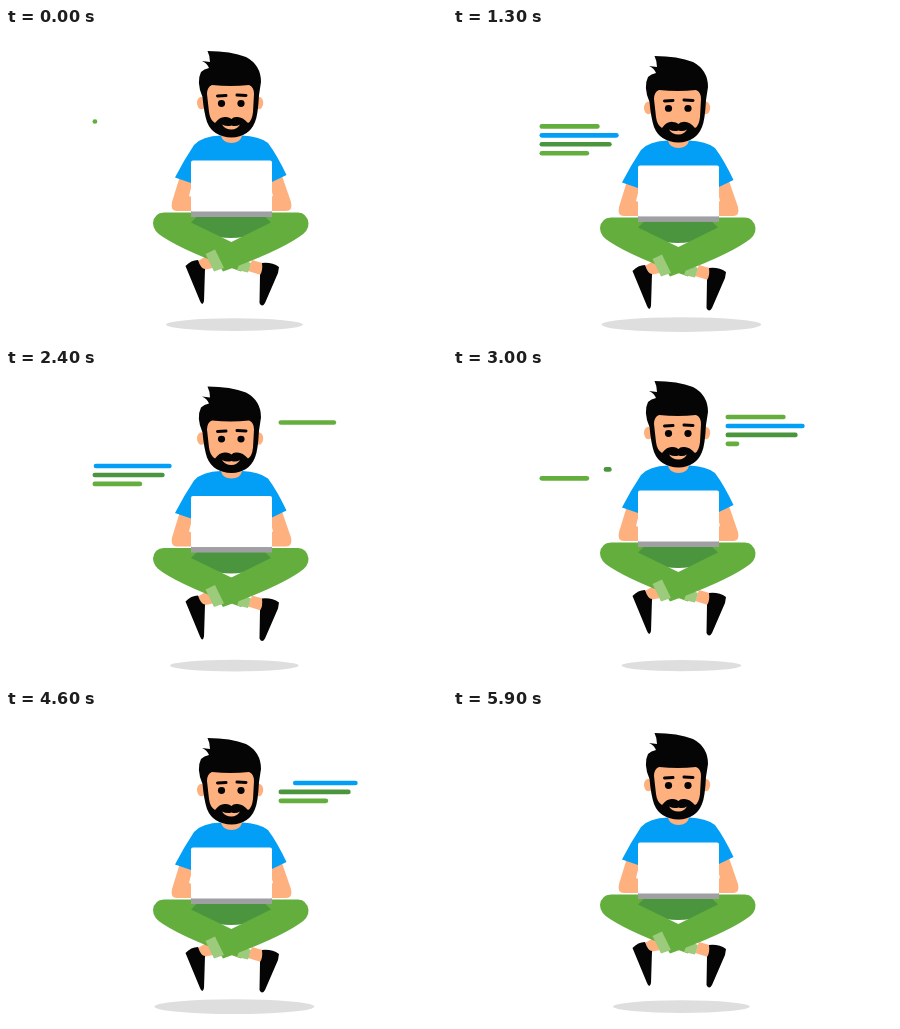
An HTML page with a canvas that plays this animation: 441 by 313 pixels, repeating every 6 s.

```html
<!DOCTYPE html>
<html lang="en">
<head>
<meta charset="utf-8">
<title>Floating coder</title>
<style>
html, body { margin: 0; width: 100%; height: 100%; overflow: hidden; background: #fff; }
canvas { display: block; width: 441px; height: 313px; }
</style>
</head>
<body>
<canvas id="stage" width="441" height="313"></canvas>
<script>
const ctx = document.getElementById('stage').getContext('2d');
const LOOP = 6000, STEP = 100;
const SKIN = '#ffb07f', BLUE = '#039ff6', GREEN = '#64ae3e', DARK = '#4b953f',
      CUFF = '#9bcb7b', BLACK = '#050505';

// Vertical drift of the figure: [time, offset]
const DRIFT = [[0, 0], [800, 5.9], [950, 6.4], [1400, 4.3], [1700, 2], [2100, -2],
  [2800, -10], [2980, -11], [3500, -6], [3800, -2], [4200, 2], [4600, 5],
  [5030, 7], [5600, 2.3], [5900, 0], [6000, -0.4]];

// Code lines: [length, colour]
const LINES = [[60, GREEN], [79, BLUE], [72, DARK], [49.5, GREEN]];
const LINE_GAP = 8.95, LINE_WIDTH = 4.6;
const TYPE_TIME = 267, ERASE_START = 2085, ERASE_TIME = 310;

const clamp = v => Math.max(0, Math.min(1, v));

function drift(t) {
  const slope = i => {
    const a = DRIFT[i - 1], b = DRIFT[i], c = DRIFT[i + 1];
    if (!a || !c) return a ? (b[1] - a[1]) / (b[0] - a[0]) : (c[1] - b[1]) / (c[0] - b[0]);
    if ((b[1] - a[1]) * (c[1] - b[1]) <= 0) return 0;
    return (c[1] - a[1]) / (c[0] - a[0]);
  };
  const i = DRIFT.findIndex(k => k[0] > t) - 1;
  const [t0, y0] = DRIFT[i], [t1, y1] = DRIFT[i + 1];
  const d = t1 - t0, u = (t - t0) / d, v = 1 - u;
  return v * v * (1 + 2 * u) * y0 + u * u * (3 - 2 * u) * y1 +
    d * u * v * (v * slope(i) - u * slope(i + 1));
}

function shape(color, path) {
  ctx.fillStyle = color;
  ctx.fill(new Path2D(path));
}

function oval(color, x, y, rx, ry) {
  ctx.fillStyle = color;
  ctx.beginPath();
  ctx.ellipse(x, y, rx, ry, 0, 0, Math.PI * 2);
  ctx.fill();
}

function stroke(color, width, path) {
  ctx.strokeStyle = color;
  ctx.lineWidth = width;
  ctx.lineCap = 'round';
  ctx.stroke(new Path2D(path));
}

function codeBlock(x, y, t) {
  const cap = LINE_WIDTH / 2;
  LINES.forEach(([length, color], i) => {
    const typed = (t - i * TYPE_TIME) / TYPE_TIME;
    const erased = (t - ERASE_START - i * ERASE_TIME) / ERASE_TIME;
    if (typed < 0 || erased >= 1) return;
    const span = length - LINE_WIDTH;
    const from = x + cap + span * clamp(erased), to = x + cap + span * clamp(typed) + 0.2;
    const row = y + i * LINE_GAP;
    stroke(color, LINE_WIDTH, `M${from} ${row}H${to}`);
  });
}

function shadow(dy) {
  const rx = 68.5 + dy * (dy > 0 ? 2.3 : 0.78);
  oval('#dedede', 228.4, 296.6, rx, 6.3 + (rx - 68.5) * 0.09);
}

function legs() {
  shape(SKIN, 'M192 233L202 227L207 240L197 242ZM246 232L260 236L255 247L242 243Z');
  shape(BLACK, 'M179.500 238Q185 232 192 232Q195 241 199 241L198 273Q196.500 279 194 273Z');
  shape(BLACK, 'M256 235Q266 234 273 239L272 245L259 275Q256 280 253.500 275L254 247Q257 243 256 235Z');
  shape(DARK, 'M183 188H267V194Q251 210 225 210Q199 210 183 194Z');
  shape(GREEN, 'M158 184.500H195L185 194.500L246 224L235 243.500Q180 224 157 209Q147 203 147 195Q148 185 158 184.500Z');
  shape(CUFF, 'M235 231L245 235L242 244.500L231 242Z');
  shape(GREEN, 'M292 184.500H255L265 194.500L205 224L217 243.500Q271 224 293 209Q303 203 302.500 195Q301 185 292 184.500Z');
  shape(CUFF, 'M199.500 226L209 221.500L218 240L208 243.500Z');
}

function torso() {
  shape(SKIN, 'M174 148L187 152L183 168L188 170V183H171Q164 183 166 174Z');
  shape(SKIN, 'M276 148L263 152L267 168L262 170V183H280Q287 183 285 174Z');
  shape(BLUE, 'M215 107.500H236Q253 108 262 115Q271 127 280.500 147L266 154V184H185V155L169 149.500Q178 132 188 117Q196 108 215 107.500Z');
  shape(SKIN, 'M215 103H236V108Q234 115 225.500 115Q217 115 215 108Z');
}

function head(blink) {
  oval(SKIN, 195.5, 75, 4.5, 6.3);
  oval(SKIN, 252.7, 75, 4.5, 6.3);
  shape(BLACK, 'M201.500 23Q225 23 240 29Q255 37 255 54L253 67Q252 87 249 94Q243 109 225.500 109.500Q207 109 201 94Q198 85 196.500 69Q190 54 195 44Q198 41 203 40Q201 35 196 33L204 34Q204 28 201.500 23Z');
  shape(SKIN, 'M206 57Q225 59 243 57Q248 59 248 66L247 84Q246 93 242 95Q236 88 230 89Q227 89 225.500 91Q223 89 220 89Q214 88 209 95Q204 92 203 84L201 66Q201 59 206 57Z');
  shape(SKIN, 'M216 96.500Q221 99 225.500 97.500Q230 99 234 96.500Q231 101.500 225.500 101.500Q219 101.500 216 96.500Z');
  stroke(BLACK, 3, 'M211.500 68L220 67.500M231 67L240 67.500');
  for (const x of [215.5, 235]) oval(BLACK, x, 75.500, 3.6, blink ? 1.2 : 3.4);
}

function laptop() {
  ctx.fillStyle = '#fff';
  ctx.beginPath();
  ctx.roundRect(185, 132.5, 81, 52, 2);
  ctx.fill();
  ctx.fillStyle = '#a09fa3';
  ctx.fillRect(185, 183.500, 81, 5.5);
}

function draw(t) {
  const dy = drift(t);
  ctx.fillStyle = '#fff';
  ctx.fillRect(0, 0, 441, 313);
  shadow(dy);
  ctx.save();
  ctx.translate(0, dy);
  codeBlock(86.5, 93.5, t);
  codeBlock(272.5, 59, t - 2145);
  legs();
  torso();
  head(t >= 700 && t < 900);
  laptop();
  ctx.restore();
}

const start = performance.now();
function tick() {
  const t = (performance.now() - start) % LOOP;
  draw(Math.floor(t / STEP) * STEP);
  requestAnimationFrame(tick);
}
tick();
</script>
</body>
</html>
```
